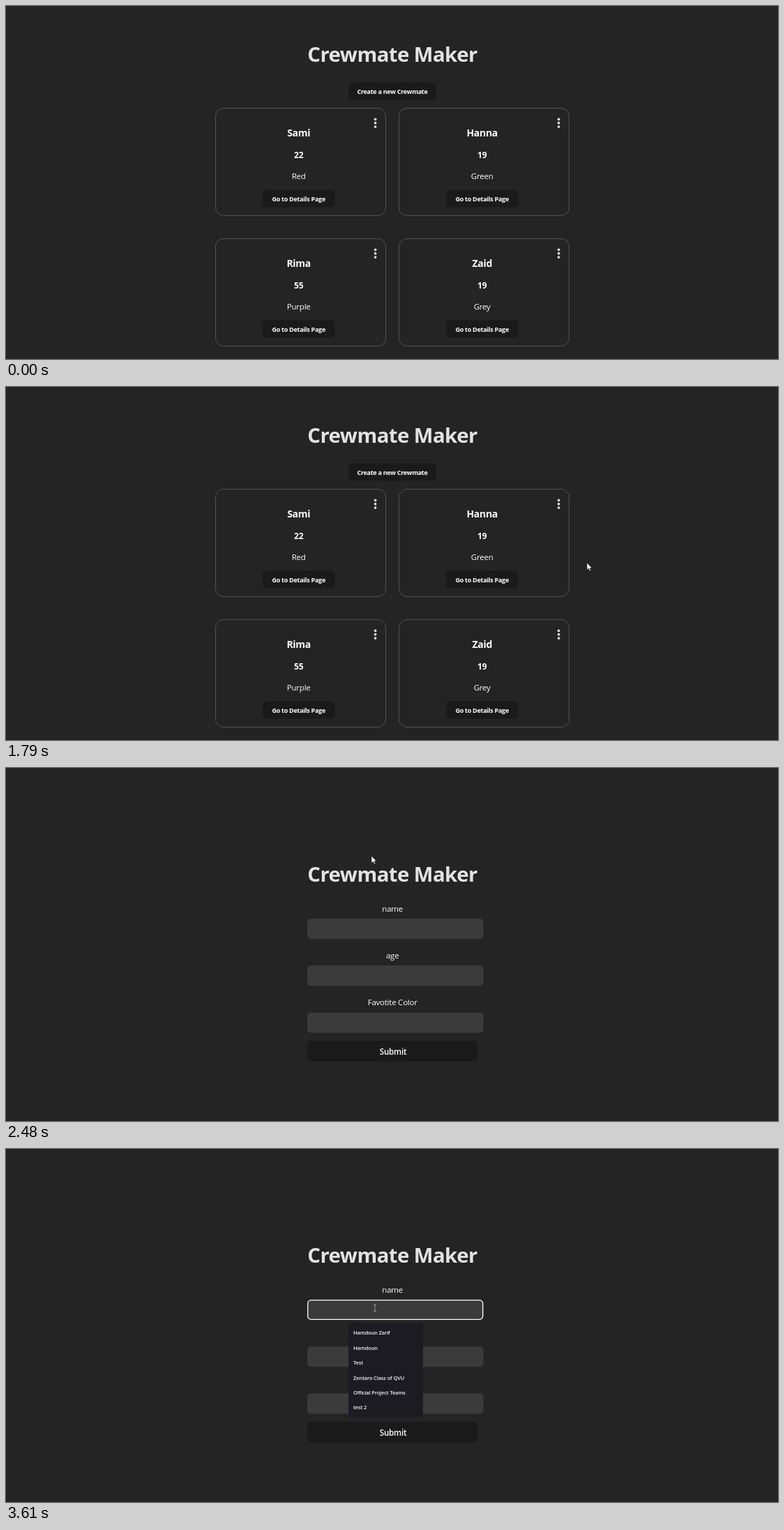
An HTML page for the animation above (3.81 s loop, 1107 px wide and 506 px high).

```html
<!DOCTYPE html>
<html lang="en">
<head>
<meta charset="utf-8">
<title>Crewmate Maker</title>
<style>
  html, body { margin: 0; width: 100%; height: 100%; overflow: hidden; background: #242424; }
  svg { display: block; width: 1107px; height: 506px; }
  text { font-family: "Open Sans", "Noto Sans", sans-serif; letter-spacing: -.02em; fill: #fff; text-anchor: middle; }
  .title { font-size: 29.4px; font-weight: 700; fill: #e3e3e3; }
  .name { font-size: 14px; font-weight: 700; }
  .age { font-size: 12px; font-weight: 700; }
  .color, .label { font-size: 11.5px; font-weight: 500; }
  .small { font-size: 9px; font-weight: 700; letter-spacing: -.03em; }
  .submit { font-size: 11.6px; font-weight: 600; }
  .option { font-size: 7.5px; font-weight: 600; text-anchor: start; fill: #f4f4f6; }
  .card { fill: none; stroke: #535353; }
  .dots { fill: #dedede; }
  .button { fill: #1a1a1a; }
  .field { fill: #3b3b3b; }
  .ring { fill: none; stroke: #fff; stroke-width: 1.3; }
  .hover { fill: none; stroke: #646cff; stroke-width: .7; }
  .menu { fill: #1c1b22; }
  .arrow, .hand { fill: #fff; stroke: #111; stroke-width: .6; stroke-linejoin: round; }
  .ibeam { fill: none; stroke: #b0b0b0; stroke-width: .8; }
  .click { fill: #d8d000; opacity: .75; }
</style>
</head>
<body>
<svg viewBox="0 0 1107 506">
  <g id="list">
    <text class="title" x="554" y="80">Crewmate Maker</text>
    <rect class="button" x="491" y="109.4" width="126" height="25" rx="5"/>
    <text class="small" x="554" y="126">Create a new Crewmate</text>
    <rect id="hover" class="hover" x="491.4" y="109.8" width="125.2" height="24.2" rx="4.6"/>
    <rect id="press" class="ring" x="491.6" y="110" width="124.8" height="23.8" rx="4.5"/>
    <g id="cards"></g>
  </g>
  <g id="form">
    <text class="title" x="554" y="163">Crewmate Maker</text>
    <g id="fields"></g>
    <rect class="button" x="432" y="391" width="244" height="29.5" rx="5"/>
    <text class="submit" x="555" y="411">Submit</text>
    <rect id="focus" class="ring" x="432.7" y="216.7" width="251" height="27.6" rx="4.8"/>
    <rect id="caret" x="439" y="223" width="1" height="14" fill="#fff"/>
    <g id="menu">
      <path class="menu" d="M497.5 251L503.5 245.5L509.5 251Z"/>
      <rect class="menu" x="491" y="250" width="107" height="134.5" rx="4"/>
    </g>
  </g>
  <g id="cursor">
    <circle id="click" class="click" cx="0" cy="1" r="7"/>
    <path id="arrow" class="arrow" d="M0 0V10.2L2.4 8.1L4 11.7L5.7 11L4.1 7.5H7.2Z"/>
    <path id="hand" class="hand" d="M-.8 1Q.2-.7 1.3 1V5Q2.3 4.3 3 5.3Q4 4.7 4.7 5.8Q6.3 5.5 6.3 7.5V10L5 13.2H-.8L-4 8.6Q-3.4 7.2-2.2 8L-.8 9.2Z"/>
    <path id="ibeam" class="ibeam" d="M-2-4.8H2M0-4.8V4.8M-2 4.8H2"/>
  </g>
</svg>
<script>
const LOOP = 3810, STEP = 1000 / 15;
const el = Object.fromEntries([...document.querySelectorAll('[id]')].map(e => [e.id, e]));
const show = (id, on) => { el[id].style.display = on ? '' : 'none'; };
const between = (t, a, b) => t >= a && t < b;

const crew = [
  ['Sami', 22, 'Red'], ['Hanna', 19, 'Green'],
  ['Rima', 55, 'Purple'], ['Zaid', 19, 'Grey'],
];
el.cards.innerHTML = crew.map(([name, age, color], i) => `
  <g transform="translate(${i % 2 * 263} ${i > 1 ? 187 : 0})">
    <rect class="card" x="300.5" y="146.5" width="244" height="154" rx="11.5"/>
    <g class="dots">${[-1, 0, 1].map(k => `<circle cx="529.6" cy="${167.7 + k * 5.4}" r="1.85"/>`).join('')}</g>
    <text class="name" x="419.7" y="187">${name}</text>
    <text class="age" x="419.7" y="217.5">${age}</text>
    <text class="color" x="419.7" y="247.5">${color}</text>
    <rect class="button" x="368" y="263.5" width="103.5" height="25" rx="5"/>
    <text class="small" x="419.7" y="280">Go to Details Page</text>
  </g>`).join('');

el.fields.innerHTML = ['name', 'age', 'Favotite Color'].map((label, i) => `
  <g transform="translate(0 ${i * 67.2})">
    <text class="label" x="554.2" y="205.6">${label}</text>
    <rect class="field" x="432" y="216" width="252.5" height="29" rx="5"/>
  </g>`).join('');

const options = ['Hamdoun Zarif', 'Hamdoun', 'Test', 'Zentaro Class of QVU', 'Official Project Teams', 'test 2'];
el.menu.innerHTML += options.map((s, i) =>
  `<text class="option" x="498" y="${266.4 + i * 21.4}">${s}</text>`).join('');

// Eased pointer curves; bend is the quadratic control point
const moves = [
  { start: 70, end: 530, from: [1067, 495], bend: [800, 290], to: [926, 299] },
  { start: 720, end: 990, from: [926, 299], bend: [860, 260], to: [835, 253] },
  { start: 1260, end: 1460, from: [835, 253], bend: [838, 254], to: [834, 253] },
  { start: 1790, end: 2340, from: [834, 252], bend: [355, 130], to: [524, 126] },
  { start: 2480, end: 3020, from: [524, 126], bend: [535, 215], to: [529, 228] },
];
const smooth = p => p * p * (3 - 2 * p);

function pointerAt(t) {
  const move = moves.filter(m => t >= m.start).pop();
  if (!move) return null;
  const { start, end, from, bend, to } = move;
  const elapsed = Math.floor((t - start + 8) / STEP) * STEP;
  const p = smooth(Math.min(1, (elapsed + 8) / (end - start)));
  const q = 1 - p;
  return from.map((a, i) => Math.round(q * q * a + 2 * p * q * bend[i] + p * p * to[i]));
}

function draw(t) {
  const form = t >= 2480;
  const p = pointerAt(t);
  show('list', !form);
  show('form', form);
  show('press', between(t, 2410, 2480));
  show('focus', t >= 3080);
  show('caret', between(t, 3080, 3610));
  show('menu', t >= 3150);
  show('cursor', p);
  show('hover', false);
  if (!p) return;

  const [x, y] = p;
  const overButton = !form && between(x, 491, 617) && between(y, 109, 135);
  const overText = form && (between(y, 138, 168) || y > 194);
  el.cursor.setAttribute('transform', `translate(${x} ${y})`);
  show('hand', overButton);
  show('ibeam', overText);
  show('arrow', !overButton && !overText);
  show('hover', overButton && t < 2410);
  show('click', between(t, 2410, 2480) || between(t, 3080, 3150));
}

const begin = performance.now();
function tick() {
  draw((performance.now() - begin) % LOOP);
  requestAnimationFrame(tick);
}
tick();
</script>
</body>
</html>
```
